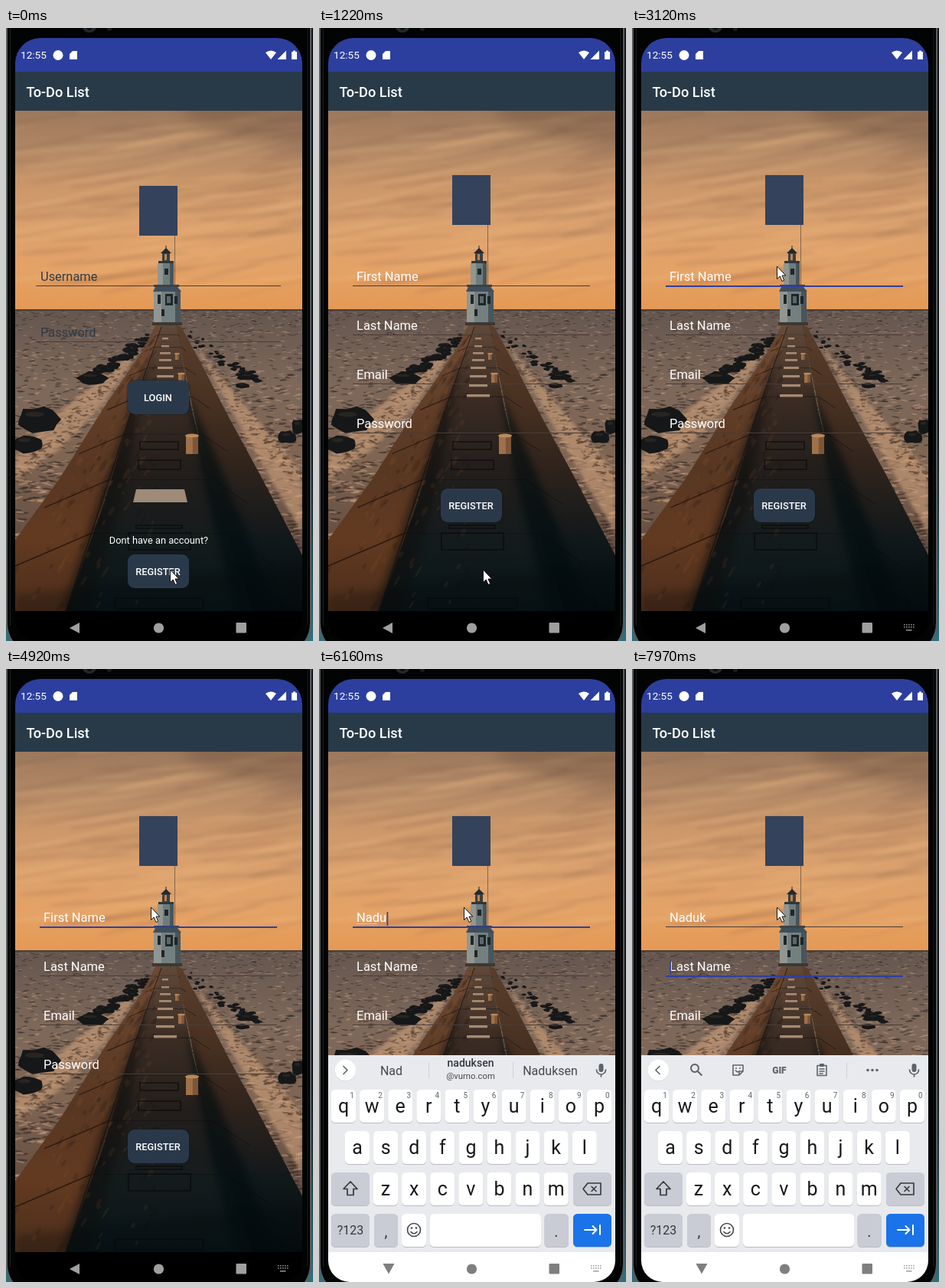
Animation, 401 px wide and 800 px high, one loop 8000 ms. Source, as an HTML page with a canvas:

```html
<!DOCTYPE html>
<html lang="en">
<head>
<meta charset="utf-8">
<title>To-Do List</title>
<style>
  html, body { margin: 0; width: 100%; height: 100%; overflow: hidden; background: #000; }
  canvas, svg { position: absolute; left: 0; top: 0; width: 401px; height: 800px; display: block; }
  text { font-family: Roboto, "Open Sans", sans-serif; white-space: pre; }
</style>
</head>
<body>
<canvas id="photo" width="401" height="800"></canvas>
<svg id="ui" viewBox="0 0 401 800"></svg>
<script>
const LOOP = 8000;
const c = document.getElementById('photo').getContext('2d');
const ui = document.getElementById('ui');

let seed = 11;
const rnd = () => (seed = (seed * 16807) % 2147483647) / 2147483647;
const between = (a, b) => a + (b - a) * rnd();

// ---------- backdrop ----------
function poly(points, fill) {
  c.beginPath();
  points.forEach(([x, y]) => c.lineTo(x, y));
  c.closePath();
  c.fillStyle = fill;
  c.fill();
}
function fade(y0, y1, ...colors) {
  const g = c.createLinearGradient(0, y0, 0, y1);
  colors.forEach((col, i) => g.addColorStop(i / (colors.length - 1), col));
  return g;
}
function box(x, y, w, h, fill) {
  c.fillStyle = fill;
  c.fillRect(x, y, w, h);
}
function blob(x, y, rx, ry, fill, tilt = 0) {
  c.beginPath();
  c.ellipse(x, y, rx, ry, tilt, 0, 7);
  c.fillStyle = fill;
  c.fill();
}
function seam(x0, y0, x1, y1, col, w) {
  c.beginPath();
  c.moveTo(x0, y0);
  c.lineTo(x1, y1);
  c.strokeStyle = col;
  c.lineWidth = w;
  c.stroke();
}
function rock(x, y, w, h) {
  const pts = [];
  for (let a = 0; a < 6.2; a += 0.45) {
    const r = between(0.78, 1.1);
    pts.push([x + Math.cos(a) * w * r, y + Math.sin(a) * h * r]);
  }
  poly(pts, '#161718');
  blob(x - w * 0.15, y - h * 0.4, w * 0.4, h * 0.2, 'rgba(84,66,54,.3)');
}

function bezel() {
  box(0, 0, 401, 800, fade(0, 800, '#15191b', '#15191b', '#15191b', '#2f6f7d'));
  c.beginPath();
  c.roundRect(1, -60, 397, 880, 44);
  c.fillStyle = '#020303';
  c.fill();
  c.strokeStyle = '#5a5e60';
  c.lineWidth = 2;
  c.stroke();
  seam(5.5, 0, 5.5, 780, '#1d2021', 1);
  seam(394, 0, 394, 780, '#1d2021', 1);
  blob(109, -2, 9, 8, '#24282b');
  blob(109, -2, 4, 5, '#0b0d10');
  blob(135, 1, 3, 3, '#1a1d20');
}

function sky() {
  box(12, 108, 375, 260, fade(108, 368, '#9c785c', '#b38966', '#cd986a', '#dca16d', '#e4a266', '#e59955'));
  c.filter = 'blur(2px)';
  for (let i = 0; i < 110; i++) {
    const y = between(105, 335);
    const tone = rnd() < 0.55 ? 'rgba(240,190,138,.16)' : 'rgba(105,78,68,.12)';
    blob(between(0, 400), y, between(30, 110), between(1, 4.5), tone, between(-0.24, -0.04));
  }
  c.filter = 'blur(10px)';
  blob(350, 125, 120, 26, 'rgba(90,66,54,.3)', 0.15);
  c.filter = 'none';
}

function sea() {
  box(12, 367, 375, 394, fade(367, 761, '#64564f', '#7d685a', '#7f6553', '#664f42', '#4a3a32'));
  for (let i = 0; i < 2600; i++) {
    const d = rnd() ** 1.2;
    const y = 369 + d * 380;
    const tone = rnd() < 0.55 ? 'rgba(38,31,29,.5)' : 'rgba(212,168,132,.42)';
    blob(between(12, 387), y, between(1.5, 4) + d * 5, 0.4 + d * 1.3, tone, between(-0.3, 0.3));
  }
  c.filter = 'blur(2px)';
  const foam = 'rgba(204,158,122,.62)';
  poly([[176, 412], [104, 474], [55, 512], [12, 560], [12, 590], [70, 550], [128, 488], [165, 436]], foam);
  poly([[238, 402], [278, 452], [340, 525], [387, 580], [387, 660], [318, 540], [262, 442]], foam);
  c.filter = 'none';
  for (let i = 0; i < 260; i++) {
    const d = rnd();
    const side = rnd() < 0.5 ? 168 - d * 150 : 250 + d * 135;
    blob(side + between(-14, 14), 420 + d * 170, between(1, 5), between(0.5, 1.5), 'rgba(70,52,42,.5)', between(-0.5, 0.5));
  }
  box(12, 367, 375, 2, 'rgba(66,55,52,.75)');
}

function rocks() {
  for (let i = 0; i < 34; i++) {
    const d = i / 33;
    rock(188 - d * 60 + between(-9, 9), 400 + d * 46 + between(-4, 4), between(2, 5) + d * 5, between(1, 2.5) + d * 2.5);
    rock(240 + d * 80 + between(-12, 12), 401 + d * 58 + between(-5, 5), between(1.5, 3.5) + d * 3, between(0.8, 2) + d * 1.2);
  }
  rock(113, 457, 23, 9);
  rock(42, 511, 31, 17);
  rock(27, 543, 20, 13);
  rock(316, 455, 15, 5);
  rock(309, 467, 9, 4);
  rock(368, 534, 13, 9);
  rock(382, 520, 10, 10);
}

function pier() {
  poly([[196, 387], [179, 420], [128, 495], [70, 588], [12, 668], [12, 761], [80, 761], [204, 387]],
    fade(387, 761, '#6b4a35', '#623f29', '#583722', '#623a20', '#4b2d1b'));
  poly([[221, 387], [229, 390], [256, 440], [290, 506], [333, 585], [387, 688], [387, 761], [300, 761]],
    fade(387, 761, '#5a3f2c', '#4a3222', '#2f231c', '#10181a', '#040d10'));
  poly([[203, 387], [222, 387], [243, 500], [266, 590], [322, 761], [78, 761], [128, 620], [164, 500]],
    fade(387, 761, '#60493a', '#3c2d24', '#231e1b', '#141b1c', '#081417'));
  c.filter = 'blur(5px)';
  poly([[235, 470], [275, 560], [355, 761], [300, 761], [262, 610]], 'rgba(3,13,16,.65)');
  poly([[188, 430], [160, 500], [118, 620], [72, 761], [108, 761], [152, 610]], 'rgba(16,16,14,.55)');
  poly([[12, 740], [387, 700], [387, 775], [12, 775]], 'rgba(4,9,11,.25)');
  c.filter = 'none';
  for (let i = 0; i < 160; i++) {
    const k = between(20, 370);
    blob(200 - k * between(0.02, 0.6), 387 + k, between(1, 3), between(2, 9), rnd() < 0.5 ? 'rgba(20,13,10,.16)' : 'rgba(150,92,52,.12)', 0.55);
  }
  seam(203, 390, 164, 500, 'rgba(20,15,13,.7)', 1);
  seam(164, 500, 78, 761, 'rgba(20,15,13,.7)', 1.5);
  for (let i = 1; i < 8; i++) {
    const y = 395 + i * i * 5.4, k = y - 387;
    const left = 204 - k * 0.34, right = 221 + k * 0.24;
    seam(left, y, left - k * 0.42, y + k * 0.18, 'rgba(20,14,12,.7)', 0.5 + i * 0.16);
    seam(left, y, right, y, 'rgba(10,10,10,.4)', 1);
    seam(right, y, right + k * 0.24, y + k * 0.16, 'rgba(5,8,9,.5)', 1);
  }
  // hatches along the walkway
  [[404, 4], [414, 5], [423, 7], [432, 8], [442, 10], [453, 11], [465, 12], [478, 15]].forEach(([y, w]) =>
    box(208 - w, y, w * 2, 2 + w / 10, '#a68970'));
  poly([[170, 602], [233, 602], [237, 619], [166, 619]], '#a08a78');
  c.strokeStyle = 'rgba(6,9,10,.7)';
  c.lineWidth = 1.5;
  [[175, 540, 50, 10], [173, 564, 55, 12], [160, 659, 81, 22], [170, 649, 60, 4], [142, 744, 116, 14]].forEach(r => c.strokeRect(...r));
  // bollards
  [[235, 531, 16, 25], [225, 450, 8, 13], [221, 424, 5, 9]].forEach(([x, y, w, h]) => {
    box(x, y, w, h, '#7d5638');
    box(x, y, w * 0.55, h, '#a07149');
    blob(x + w / 2, y + 1, w / 2 + 1, h * 0.1, '#b98a5c');
  });
}

function lighthouse() {
  seam(220.5, 257, 220.5, 345, 'rgba(70,60,58,.6)', 1);
  box(193, 342, 35, 45, '#74807f');
  box(193, 342, 10, 45, '#929690');
  box(221, 342, 7, 45, '#48555b');
  box(198, 307, 21, 30, '#6f7c7e');
  box(198, 307, 7, 30, '#93968f');
  box(214, 307, 5, 30, '#48545a');
  box(193, 335, 33, 3, '#39444c');
  poly([[195, 338], [224, 338], [229, 344], [192, 344]], '#3f4e5c');
  box(199, 304, 20, 3, '#30373c');
  box(204, 293, 10, 11, '#3c3f40');
  box(207, 295, 3, 8, '#b98456');
  poly([[202, 294], [209, 287], [216, 294]], '#23292f');
  box(208.5, 284, 1, 5, '#23292f');
  [[207, 314, 5, 8], [198, 348, 4, 12], [208, 347, 10, 15], [203, 367, 4, 9], [220, 350, 4, 10]].forEach(r => box(...r, '#1d262a'));
  box(210, 350, 5, 9, '#5d6768');
  box(191, 384, 39, 4, '#3c3833');
}

bezel();
c.save();
c.beginPath();
c.rect(12, 108, 375, 653);
c.clip();
sky();
sea();
rocks();
pier();
lighthouse();
c.restore();

// ---------- interface ----------
const rect = (x, y, w, h, fill, r = 0, more = '') =>
  `<rect x="${x}" y="${y}" width="${w}" height="${h}" rx="${r}" fill="${fill}" ${more}/>`;
const label = (x, y, size, str, fill = '#fff', more = '') =>
  `<text x="${x}" y="${y}" font-size="${size}" fill="${fill}" ${more}>${str}</text>`;
const path = (d, fill, more = '') => `<path d="${d}" fill="${fill}" ${more}/>`;
const line = (d, col, w = 1.8) => path(d, 'none', `stroke="${col}" stroke-width="${w}" stroke-linecap="round" stroke-linejoin="round"`);
const dot = (x, y, r, fill) => `<circle cx="${x}" cy="${y}" r="${r}" fill="${fill}"/>`;
const group = (id, body) => `<g id="${id}">${body}</g>`;
const mid = 'text-anchor="middle"', bold = 'font-weight="500"';

const GREY = '#5f6368', BLUE = '#303f9f', INK = '#2e3b48', RULE = '#493d38';
const button = (y, str, id) =>
  rect(157.5, y - 1, 83, 46, '#10161c', 10, 'opacity=".3"') +
  rect(159, y, 80, 44, '#2a394a', 9, `id="${id}"`) +
  label(198.5, y + 27, 12.8, str, '#fff', `${mid} ${bold}`);
const rule = (x, y, w) => rect(x, y, w, 1, RULE);
const logo = y => rect(174, y, 50, 65, '#34425c');

const statusBar =
  path('M12 57V46a33 33 0 0 1 33-33H354a33 33 0 0 1 33 33V57Z', '#2d3f9e') +
  label(19, 40, 13.6, '12:55') + dot(68, 35.5, 6.5, '#fff') +
  path('M87 30h6v11h-10v-7Z', '#fff') +
  path('M339 32q7-5 14 0l-7 9Z', '#fff') + path('M366 29.500v11.500h-11.500Z', '#fff') +
  path('M373 31h2v-1.500h3v1.500h2v10h-7Z', '#fff') +
  rect(12, 57, 375, 51, '#283a48') + label(26.5, 90, 18.2, 'To-Do List', '#fff', bold);

const login = group('login', logo(206) +
  label(45, 330, 16.4, 'Username', INK) + rule(39, 336, 320) +
  label(45, 403, 16.4, 'Password', INK) + rule(39, 409, 320) +
  button(460, 'LOGIN', 'enter') +
  label(199.5, 673, 12.8, 'Dont have an account?', '#fff', mid) +
  button(687, 'REGISTER', 'open'));

const form = group('form', logo(192) +
  ['First Name', 'Last Name', 'Email', 'Password'].map((str, i) =>
    label(49, 330 + i * 64, 16.5, str, '#fff', `id="hint${i}"`) + rule(44, 336 + i * 64, 310)).join('') +
  rect(44, 336, 310, 2, BLUE, 0, 'id="focus"') +
  label(49, 330, 16.5, '', '#fff', 'id="name"') +
  rect(49, 332, 0, 1, '#fff', 0, 'id="compose" opacity=".45"') +
  rect(49.5, 317, 1.6, 18, BLUE, 0, 'id="caret"') +
  button(601, 'REGISTER', 'send'));

const imeIcon = fill => {
  let s = '';
  for (let i = 0; i < 10; i++) s += rect(355 + (i % 5) * 3, 778 + (i > 4 ? 3 : 0), 1.6, 1.6, fill);
  return s + rect(358, 785, 7.5, 1.6, fill);
};
const home = fill => dot(199.5, 783, 6.6, fill) + rect(300.5, 776, 13.5, 13.5, fill, 1);
const navShape = 'M12 761H387V772a28 28 0 0 1-28 28H40a28 28 0 0 1-28-28Z';
const darkNav = path(navShape, '#000') +
  path('M83 783l13-7v14Z', '#a09f9f') + home('#a09f9f') + group('darkIme', imeIcon('#8d8d8d'));
const lightNav = path(navShape, '#fff') +
  group('navIcons', path('M83.500 776h15l-7.500 13.500Z', '#7f7f7f') + home('#7f7f7f') + imeIcon('#a5a5a5'));

const key = (x, y, w, fill) => rect(x, y + 1, w, 43, '#b9bcc2', 5.5) + rect(x, y, w, 43, fill, 5.5);
const keyRow = (str, x, y, digits) => [...str].map((ch, i) => {
  const kx = x + i * 37.1;
  return key(kx, y, 32, '#fff') + label(kx + 16, y + 30, 25, ch, '#17191c', mid) +
    (digits ? label(kx + 27, y + 11, 10, (i + 1) % 10, GREY, mid) : '');
}).join('');

const tools = group('tools', line('M36 518.500l-5 5 5 5', GREY, 1.7) +
  line('M87 521a5 5 0 1 0-10 0a5 5 0 1 0 10 0M85.800 525l5 5', GREY, 2) +
  line('M132 517h13v8l-5 5h-8ZM140 530v-5h5M135.500 524q2 3 4 1', GREY, 1.6) +
  dot(136, 521, 1, GREY) + dot(141, 521, 1, GREY) +
  label(192.5, 528, 12, 'GIF', GREY, `${mid} font-weight="900"`) +
  line('M242 517.500h12v13h-12ZM245 522h6M245 525h6M245 528h4', GREY, 1.6) + rect(245, 515, 6, 4, GREY, 1) +
  rect(280, 514, 1, 20, '#cfd2d6') + [308, 314, 320].map(x => dot(x, 523.5, 1.8, GREY)).join(''));
const hints = group('hints', line('M32 518.500l5 5-5 5', GREY, 1.7) +
  rect(143, 513, 1, 21, '#cfd2d6') + rect(253, 513, 1, 21, '#cfd2d6') +
  label(94.5, 530, 16, '', '#44474b', `${mid} id="word"`) +
  label(198, 519, 14, '', '#34373b', `${mid} ${bold} id="mail"`) +
  label(198, 535, 11.3, '@vurno.com', '#44474b', mid) +
  label(302, 530, 16, 'Naduksen', '#44474b', mid));

const keyboard = group('keyboard', rect(12, 504, 375, 258, '#e8eaee') +
  dot(34.5, 524, 14, '#d5d8dc') + dot(34.5, 523.5, 13.7, '#fff') + tools + hints +
  rect(365.5, 515, 6, 11, GREY, 3) + line('M362.500 523a6 6 0 0 0 12 0M368.500 529v3', GREY, 1.7) +
  keyRow('qwertyuiop', 16, 549, true) + keyRow('asdfghjkl', 34, 603) + keyRow('zxcvbnm', 71, 657) +
  key(16, 657, 50, '#c9ccd4') + line('M41 669l-9 9.500h5v8h8v-8h5Z', '#34373b', 1.7) +
  key(332, 657, 50, '#c9ccd4') + line('M351 671h17v15h-17l-6-7.500ZM356 675.500l6 6M362 675.500l-6 6', '#34373b', 1.6) +
  key(16, 711, 50, '#c9ccd4') + label(41, 738, 16, '?123', '#34373b', mid) +
  key(72, 711, 31, '#c9ccd4') + label(87.5, 741, 20, ',', '#34373b', mid) +
  key(108, 711, 32, '#fff') + line('M132.500 732a8.500 8.500 0 1 0-17 0a8.500 8.500 0 1 0 17 0M120 734.500q4 4.500 8 0', '#45484c', 1.6) +
  dot(121, 729.5, 1.3, '#45484c') + dot(127, 729.5, 1.3, '#45484c') +
  key(145, 711, 145, '#fff') +
  key(294.5, 711, 31.5, '#c9ccd4') + label(310, 741, 20, '.', '#34373b', mid) +
  key(332, 711, 50, '#1a73e8') + line('M347 732h15M357.500 727l5 5-5 5M367 726v12', '#fff', 2) +
  lightNav);

const pointer = group('pointer', path('M0 0V16.500L3.800 13L6.500 19.500L9.200 18.300L6.500 12H11.300Z', '#fff', 'stroke="#111" stroke-width="1"'));

ui.innerHTML = statusBar + login + form + darkNav + keyboard + pointer;

// ---------- timeline ----------
const start = {
  at: [214.5, 707], press: '#2a394a', mix: 0, focus: -1, caret: false, ime: 0,
  kb: 0, nav: 0, name: '', under: 0, word: '', mail: ''
};
const steps = [
  [710, { press: '#314357' }],
  [830, { press: '#3a4d61' }],
  [1100, { mix: 0.5 }],
  [1220, { mix: 1 }],
  [1780, { at: [214.5, 702] }],
  [1930, { at: [202.5, 479] }],
  [2080, { at: [198.5, 383] }],
  [2200, { at: [194.5, 308] }],
  [2350, { at: [189.5, 311] }],
  [2470, { focus: 0 }],
  [2590, { caret: true }],
  [3120, { caret: false, ime: 1 }],
  [4770, { caret: true }],
  [4920, { caret: false }],
  [5450, { caret: true, kb: 1, nav: 0.06 }],
  [5760, { caret: false, nav: 0.85 }],
  [6010, { caret: true, nav: 1, name: 'Nadu', under: 27, word: 'Na', mail: 'naduk' }],
  [6160, { word: 'Nad', mail: 'naduksen' }],
  [6310, { under: 37, word: 'Nadu' }],
  [6710, { caret: false }],
  [7140, { caret: true, name: 'Naduk' }],
  [7420, { under: 47, word: 'Naduk' }],
  [7690, { focus: 1, under: 0 }],
  [7970, { word: '' }]
];

const el = id => document.getElementById(id);
const set = (id, attr, value) => el(id).setAttribute(attr, value);
const show = (id, on) => { el(id).style.opacity = +on; };

function draw(time) {
  const s = Object.assign({}, start, ...steps.filter(([t]) => t <= time).map(([, change]) => change));
  set('pointer', 'transform', `translate(${s.at})`);
  set('open', 'fill', s.press);
  show('login', 1 - s.mix);
  show('form', s.mix);
  show('focus', s.focus >= 0);
  set('focus', 'y', 336 + Math.max(s.focus, 0) * 64);
  show('darkIme', s.ime);
  show('keyboard', s.kb);
  show('navIcons', s.nav);
  show('hint0', !s.name);
  el('name').textContent = s.name;
  set('compose', 'width', s.under);
  const typed = s.focus === 0 && s.name ? el('name').getComputedTextLength() : 0;
  show('caret', s.caret);
  set('caret', 'x', 49.5 + typed);
  set('caret', 'y', s.focus === 1 ? 381 : 317);
  show('tools', !s.word);
  show('hints', !!s.word);
  el('word').textContent = s.word;
  el('mail').textContent = s.mail;
}

const t0 = performance.now();
function tick() {
  draw((performance.now() - t0) % LOOP);
  requestAnimationFrame(tick);
}
tick();
</script>
</body>
</html>
```
